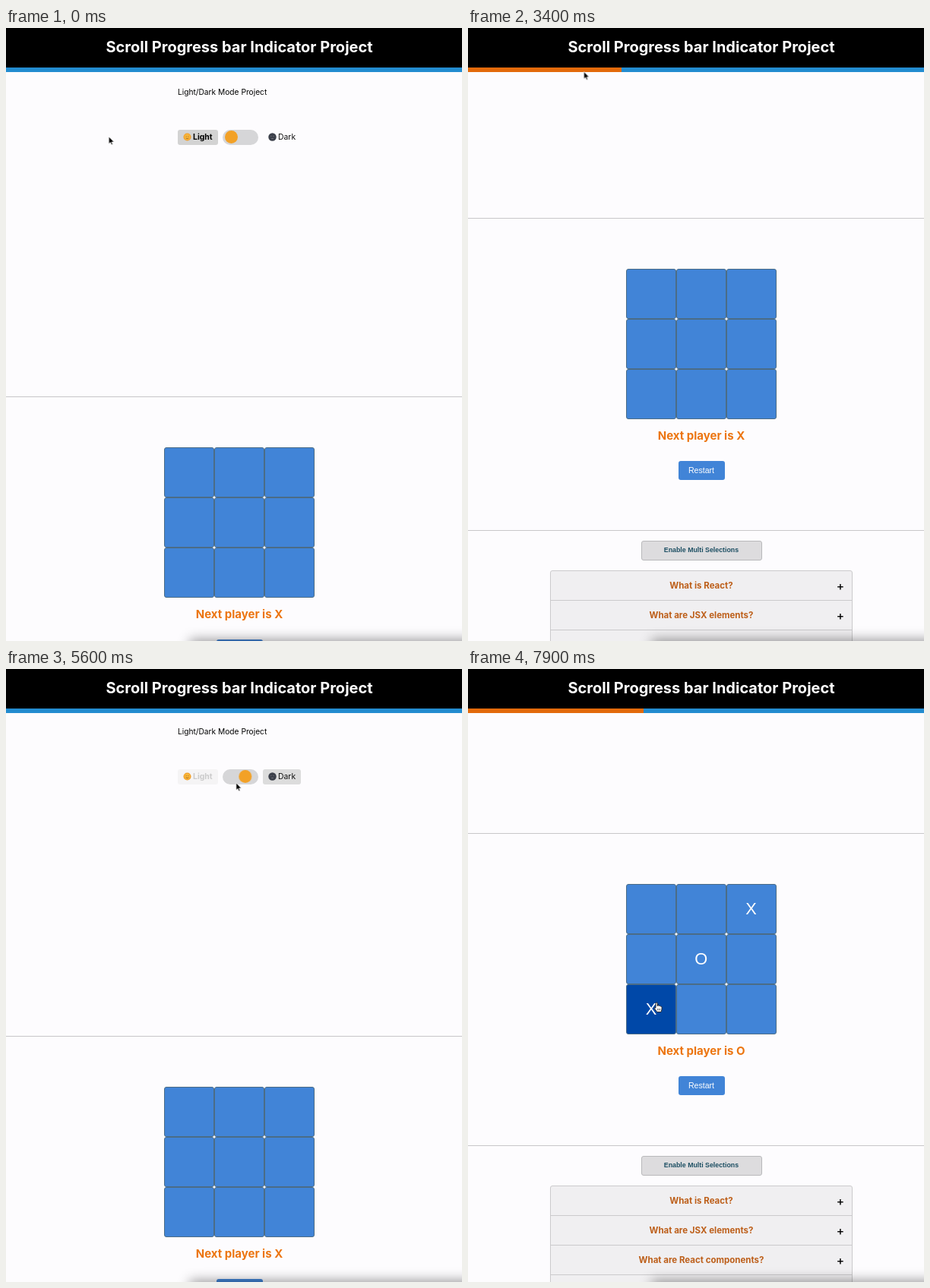
An HTML page for the animation above (8 s loop, 600x807 px).

```html
<!DOCTYPE html>
<html lang="en">
<head>
<meta charset="utf-8">
<title>Scroll progress demo</title>
<style>
html, body { margin: 0; width: 100%; height: 100%; overflow: hidden; background: #fdfcfe; }
#stage {
  --blue: #4184d7; --loop: 8s linear infinite; --step: 8s step-end infinite;
  position: relative; width: 600px; height: 807px; overflow: hidden;
  background: #fdfcfe; color: #000; font-family: Inter, sans-serif;
}
#stage div { position: absolute; box-sizing: border-box; }
.mid { left: 0; width: 614px; text-align: center; white-space: nowrap; }

/* header */
#head { left: 0; top: 0; width: 600px; height: 52px; background: #000; }
#title { top: 0; line-height: 51px; font-size: 20px; font-weight: 700; color: #fff; }
#track { left: 0; top: 51.5px; width: 600px; height: 6.5px; background: #238cd0; }
#bar { left: 0; top: 0; height: 100%; background: #e36a0b; animation: bar var(--loop); }
@keyframes bar {
  0%, 1.25% { width: 0 }
  11.25%, 12.25% { width: 113px }
  22.5%, 34.4% { width: 156px }
  42.5%, 43.5% { width: 202px }
  45.5% { width: 214px }
  57.5%, 71.5% { width: 0 }
  78.75%, 79.75% { width: 124px }
  89%, 100% { width: 231px }
}

/* page */
#page { left: 0; top: 0; width: 600px; height: 1200px; animation: scroll var(--loop); }
@keyframes scroll {
  0%, 1.25% { transform: translateY(0) }
  11.25%, 12.25% { transform: translateY(-136px) }
  22.5%, 34.4% { transform: translateY(-184px) }
  42.5%, 43.5% { transform: translateY(-235px) }
  45.5% { transform: translateY(-248px) }
  57.5%, 71.25% { transform: translateY(-2px) }
  78.75%, 79.75% { transform: translateY(-157px) }
  88.5%, 100% { transform: translateY(-269px) }
}
.rule { left: 0; width: 600px; height: 1px; background: #c8c7c9; }

/* light and dark */
#mode { left: 0; top: 0; width: 600px; height: 486px; animation: mode var(--step); }
@keyframes mode {
  0%, 69% { background: #fdfcfe; color: #000 }
  62% { background: #000; color: #fff }
}
#name { left: 226px; top: 74px; line-height: 20px; font-size: 10.2px; white-space: nowrap; }
#row { left: 226px; top: 134px; height: 19.5px; display: flex; gap: 6.5px; font-size: 10.4px; }
.label {
  display: flex; align-items: center; gap: 2px; padding: 0 7px;
  border-radius: 3px; line-height: 19.5px;
}
.label svg { width: 11px; height: 11px; }
#light { animation: light-bg var(--loop), light-on var(--step); }
#dark { animation: dark-bg var(--loop), dark-on var(--step); }
@keyframes light-bg {
  0%, 62%, 74%, 100% { background: #d3d3d3; color: #000 }
  67%, 69% { background: #d3d3d300; color: #fff }
}
@keyframes dark-bg {
  0%, 62%, 74%, 100% { background: #d3d3d300 }
  67%, 69% { background: #d3d3d3 }
}
@keyframes light-on { 0%, 69% { font-weight: 700 } 62% { font-weight: 400 } }
@keyframes dark-on {
  0%, 69% { font-weight: 400; color: #111 }
  62% { font-weight: 700; color: #222 }
}
#switch { width: 46.5px; height: 19.5px; border-radius: 10px; background: #d6d6d8; }
#stage #switch { position: relative; }
#stage .label { position: relative; }
#thumb {
  left: 3px; top: 1.25px; width: 17px; height: 17px; border-radius: 50%;
  animation: slide var(--loop), tint var(--step);
}
@keyframes slide {
  0%, 62%, 74%, 100% { transform: none }
  67%, 69% { transform: translateX(23px) }
}
@keyframes tint { 0%, 69% { background: #f2a127 } 62% { background: #333 } }

/* board */
#board {
  left: 208px; top: 552px; width: 197.5px; height: 197px;
  display: grid; grid-template: repeat(3, 1fr) / repeat(3, 1fr);
}
#board div {
  position: static; border: 1px solid #4b6c86; border-radius: 3px; background: var(--blue);
  color: #fff; font: 21.8px/64px "Liberation Sans", Arial, sans-serif; text-align: center;
}
#c3 { animation: hover3 var(--step); }
#c5 { animation: hover5 var(--step); }
#c7 { animation: hover7 var(--step); }
@keyframes hover3 { 0%, 92.9% { background: #4184d7 } 87% { background: #0048a8 } }
@keyframes hover5 { 0%, 96% { background: #4184d7 } 92.9% { background: #0048a8 } }
@keyframes hover7 { 0% { background: #4184d7 } 96% { background: #0048a8 } }
#c3 span { animation: mark3 var(--step); }
#c5 span { animation: mark5 var(--step); }
#c7 span { animation: mark7 var(--step); }
@keyframes mark3 { 0% { opacity: 0 } 90.6% { opacity: 1 } }
@keyframes mark5 { 0% { opacity: 0 } 94.4% { opacity: 1 } }
@keyframes mark7 { 0% { opacity: 0 } 97.4% { opacity: 1 } }
.next { top: 761px; line-height: 22px; font-size: 15px; font-weight: 700; color: #ec7510; }
#nextX { animation: turnX var(--step); }
#nextO { animation: turnO var(--step); }
@keyframes turnX { 0%, 94.4% { opacity: 1 } 90.6%, 97.4% { opacity: 0 } }
@keyframes turnO { 0%, 94.4% { opacity: 0 } 90.6%, 97.4% { opacity: 1 } }
#restart {
  left: 276.5px; top: 804.5px; width: 61px; height: 25.5px; border-radius: 3px;
  background: var(--blue); color: #fff; text-align: center;
  font: 10.6px/25.5px "Liberation Sans", Arial, sans-serif;
}

/* accordion */
#multi {
  left: 227.5px; top: 910px; width: 159px; height: 25.5px; border-radius: 3px;
  border: 1px solid #b9b9bb; background: #dddcde; color: #1d4f63; text-align: center;
  font: bold 8.8px/23.5px "Liberation Sans", Arial, sans-serif;
}
#list {
  left: 108px; top: 949px; width: 398px; height: 158px; border-radius: 3px;
  border: 1px solid #cbcacc; background: #f0eff1;
}
#list div {
  position: relative; height: 39px; border-bottom: 1px solid #cbcacc; padding-right: 8px;
  padding-left: 8px; text-align: center; line-height: 38px;
  font-size: 11.5px; font-weight: 700; color: #bd5f1a;
}
#list div::after {
  content: "+"; position: absolute; right: 10px; top: 1px; width: 10px;
  display: flex; justify-content: center; font-size: 15.5px; font-weight: 500; color: #000;
}

/* overlays */
#shade { left: 245px; top: 808px; width: 420px; height: 20px; box-shadow: 0 0 16px 3px #0006; }
#pointer { left: 0; top: 0; animation: point var(--loop); }
#pointer svg { position: absolute; left: 0; top: 0; overflow: visible; }
@keyframes point {
  0%, 1.25% { transform: translate(135.3px, 143px) }
  11.25%, 17% { transform: translate(134.5px, 145.5px) }
  24.5% { transform: translate(156px, 38px) }
  26.25%, 27.5% { transform: translate(158px, 29px) }
  30.5% { transform: translate(76px, 52px) }
  34%, 46% { transform: translate(152.5px, 57.5px) }
  58.5%, 69.5% { transform: translate(304px, 146.5px) }
  77%, 81% { transform: translate(286px, 196.5px) }
  88.5%, 91.5% { transform: translate(372px, 318px) }
  93.7%, 95% { transform: translate(312px, 384px) }
  97.2%, 100% { transform: translate(248px, 439px) }
}
#arrow { animation: arrow var(--step); }
#beam { animation: beam var(--step); }
#hand { animation: hand var(--step); }
@keyframes arrow { 0%, 28.5%, 70% { opacity: 1 } 24.5%, 58%, 87% { opacity: 0 } }
@keyframes beam { 0%, 28.5% { opacity: 0 } 24.5% { opacity: 1 } }
@keyframes hand { 0%, 70% { opacity: 0 } 58%, 87% { opacity: 1 } }
</style>
</head>
<body>
<div id="stage">
  <div id="page">
    <div id="mode">
      <div id="name">Light/Dark Mode Project</div>
      <div id="row">
        <div class="label" id="light">
          <svg viewBox="-6 -6 12 12">
            <circle r="5.5" fill="#f2a02a"/><circle r="4" fill="#f8b83c"/>
            <path d="M-2-1h1M1-1h1M-2 1.5Q0 3.2 2 1.5" fill="none" stroke="#9c5a16"/>
          </svg>Light
        </div>
        <div id="switch"><div id="thumb"></div></div>
        <div class="label" id="dark">
          <svg viewBox="-6 -6 12 12">
            <circle r="5.7" fill="#3b3f4a"/>
            <path d="M-2.5-1.2h1.4M1-1.2h1.4M-1.5 2.2h3" stroke="#77777f"/>
          </svg>Dark
        </div>
      </div>
    </div>
    <div class="rule" style="top:485px"></div>
    <div id="board">
      <div></div><div></div><div id="c3"><span>X</span></div>
      <div></div><div id="c5"><span>O</span></div><div></div>
      <div id="c7"><span>X</span></div><div></div><div></div>
    </div>
    <div class="mid next" id="nextX">Next player is X</div>
    <div class="mid next" id="nextO">Next player is O</div>
    <div id="restart">Restart</div>
    <div class="rule" style="top:896px"></div>
    <div id="multi">Enable Multi Selections</div>
    <div id="list">
      <div>What is React?</div>
      <div>What are JSX elements?</div>
      <div>What are React components?</div>
    </div>
  </div>
  <div id="head"><div class="mid" id="title">Scroll Progress bar Indicator Project</div></div>
  <div id="track"><div id="bar"></div></div>
  <div id="shade"></div>
  <div id="pointer">
    <svg id="arrow" width="8" height="12">
      <path d="M0 0V9.6L2.2 7.6 3.6 11 5.2 10.3 3.8 7.1H6.8Z" fill="#000" stroke="#fff" stroke-width=".7"/>
    </svg>
    <svg id="beam" width="8" height="12" fill="none">
      <path id="bar-shape" d="M-2.5-6Q0-6 0-4V4Q0 6-2.5 6M2.5-6Q0-6 0-4V4Q0 6 2.5 6M-1.5 2h3" stroke="#ddd" stroke-width="2.2"/>
      <use href="#bar-shape" style="stroke:#000"/>
      <path d="M0-5V5" stroke="#222"/>
    </svg>
    <svg id="hand" width="10" height="13">
      <path d="M-1 1Q-1 0 0 0T1.2 1V4.3Q3-.2 1.2 4.3 2.3 3.3 3.4 4.6 4.6 3.8 5.4 5.2 7 4.8 7 6.4V9L6 12.5H.8L-2.8 7.8Q-3.4 6.4-1 7.2Z" fill="#fff" stroke="#222" stroke-width=".9"/>
      <path d="M1.6 8v2.6M3.2 8v2.6M4.8 8v2.6" stroke="#222" stroke-width=".6"/>
    </svg>
  </div>
</div>
</body>
</html>
```
